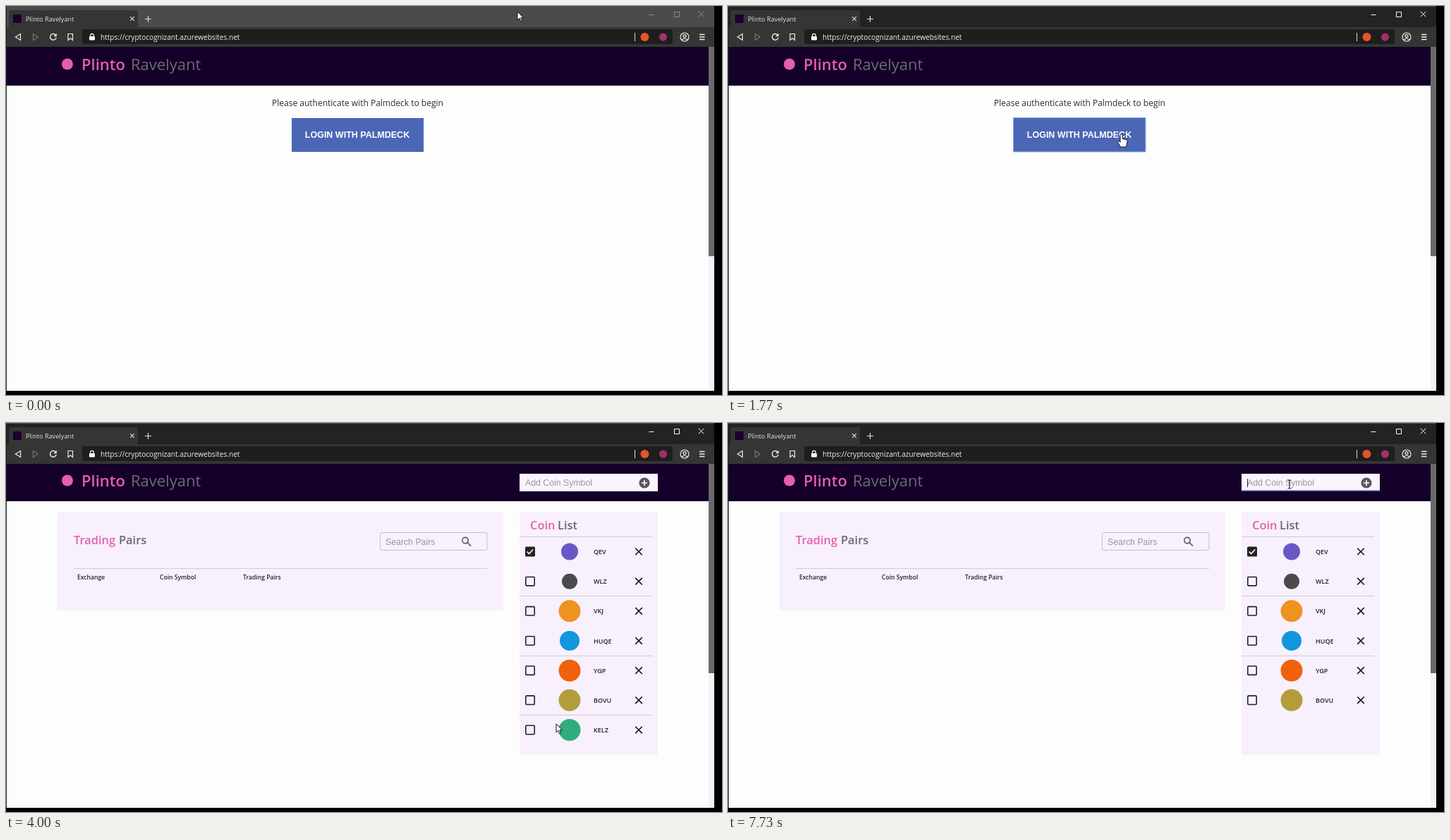
An HTML page for the animation above (8000 ms loop, 1015x552 px).

```html
<!DOCTYPE html>
<html lang="en">
<head>
<meta charset="utf-8">
<title>Coin list demo</title>
<style>
  html, body { margin: 0; width: 100%; height: 100%; overflow: hidden; background: #000; }
  svg { display: block; font-family: "Open Sans", "Noto Sans", sans-serif; }
  .arial { font-family: "Liberation Sans", Arial, sans-serif; }
  .semi { font-weight: 600; }
  .line { fill: none; stroke-linecap: butt; }
</style>
</head>
<body>
<svg id="stage" width="1015" height="552" viewBox="0 0 1015 552"></svg>
<script>
const LOOP = 8000;
const PINK = '#e65fa8', GREY = '#6c6670', PANEL = '#f8f0fd', NAVY = '#140029';

const rect = (x, y, w, h, fill, more = '') =>
  `<rect x="${x}" y="${y}" width="${w}" height="${h}" fill="${fill}" ${more}/>`;
const dot = (x, y, r, fill) => `<circle cx="${x}" cy="${y}" r="${r}" fill="${fill}"/>`;
const line = (d, color, w = 1, more = '') =>
  `<path class="line" d="${d}" stroke="${color}" stroke-width="${w}" ${more}/>`;
const text = (x, y, size, fill, str, more = '') =>
  `<text x="${x}" y="${y}" font-size="${size}" fill="${fill}" ${more}>${str}</text>`;
const group = (id, body) => `<g id="${id}">${body}</g>`;
const cross = (x, y, r, color, w) =>
  line(`M${x - r} ${y - r}l${2 * r} ${2 * r}m0 ${-2 * r}l${-2 * r} ${2 * r}`, color, w);

const SEMI = 'class="semi"', ARIAL = 'class="arial"';

function browser() {
  return rect(0, 0, 1004, 547, '#1b1b1b') +
    rect(1, 1, 1003, 57, '#232323', 'id="strip"') +
    rect(0, 0, 1004, 1, '#505050') +
    `<path d="M4 30V9q0-3 3-3H184q3 0 3 3V30z" fill="#353535"/>` +
    rect(1, 30, 1003, 28, '#353535') +
    rect(10, 12, 12, 12, '#1a0030') +
    text(28, 21.5, 9.2, '#e2e2e2', 'Plinto Ravelyant') +
    cross(179, 18, 2.8, '#ddd', 1.2) +
    line('M197 18.5h9M201.5 14v9', '#ddd', 1.2) +
    group('winbuttons',
      line('M911.5 12.5h7', '#fff') +
      line('M947.5 8.5h7v7h-7z', '#fff') +
      cross(985.5, 11.5, 3.8, '#fff', 1)) +
    line('M20.5 39.5v9l-7-4.5z', '#eee', 1.2) +
    line('M38.5 39.5v9l7-4.5z', '#777', 1.2) +
    line('M70.6 41.4a4.4 4.4 0 1 0 .6 3.6', '#eee', 1.4) +
    `<path d="M71.8 38.8v4.4h-4.4z" fill="#eee"/>` +
    line('M88 39.5h6.5v9l-3.2-2.8-3.3 2.8z', '#eee', 1.2) +
    rect(108, 33, 837, 21, '#1e1e1e', 'rx="3"') +
    rect(118, 43, 8, 5.5, '#fff', 'rx="1"') +
    line('M119.8 43.5v-2a2.2 2.2 0 0 1 4.4 0v2', '#fff', 1.2) +
    text(134, 47.5, 10.1, '#f0f0f0', 'https://cryptocognizant.azurewebsites.net') +
    line('M891.5 38v12', '#ddd') +
    dot(905.5, 44, 6, '#e8532a') +
    dot(931.5, 44, 5.5, '#a3306e') +
    line('M956 44a6 6 0 1 0 12 0a6 6 0 1 0-12 0M958 48q4-3.5 8 0', '#eee', 1.2) +
    line('M960 42.6a2 2 0 1 0 4 0a2 2 0 1 0-4 0', '#eee', 1.2) +
    line('M983 40.5h7.5M983 44h7.5M983 47.5h7.5', '#eee', 1.3) +
    rect(1, 58, 1003, 488, '#fdfdfd') +
    rect(996, 58, 8, 488, '#f6f0fb') +
    rect(996, 58, 8, 297, '#6a6a6a');
}

// Header bar; the login page has a slightly taller one
const header = (h, base) =>
  rect(1, 58, 995, h, NAVY) +
  dot(87, base - 8.5, 8, PINK) +
  text(107, base, 22, PINK, 'Plinto', SEMI) +
  text(177, base, 22, '#6e6a70', 'Ravelyant', 'font-weight="500"');

function loginPage() {
  return header(55, 91) +
    text(498.5, 142, 12, '#2c2c30', 'Please authenticate with Palmdeck to begin', 'text-anchor="middle"') +
    rect(405, 159, 187, 48, '#4c66b6') +
    line('M404.5 158.5h187.5v48.5h-187.5z', '#8fb0ee', 1, 'id="ring"') +
    text(498, 187, 12.5, '#fff', 'LOGIN WITH PALMDECK', 'class="arial" font-weight="700" text-anchor="middle"');
}

const coins = [
  ['QEV', '#6a58c4', 12], ['WLZ', '#4b4b4b', 11], ['VKJ', '#ee9322', 15.5], ['HUQE', '#1496dc', 14],
  ['YGP', '#f0610c', 15.5], ['BOVU', '#b39c3c', 15.5], ['KELZ', '#2fae7c', 15.5]
];

function coinRow([name, color, r], i) {
  const y = 182.5 + i * 42.17;
  const box = i === 0
    ? rect(736, y - 7, 14, 14, '#222', 'rx="1.5"') + line(`M738.6 ${y}l3 3 5.6-6`, '#fff', 1.6)
    : rect(736.8, y - 6.2, 12.4, 12.4, 'none', 'rx="1" stroke="#222" stroke-width="1.6"');
  const rule = i && i % 2 === 0 ? line(`M728 ${Math.round(y - 21.5) + .5}H916`, '#cfcbd3') : '';
  return group('row' + i, rule + box + dot(799, y, r, color) +
    text(833, y + 3.5, 9, '#222', name, SEMI) + cross(897, y, 4.8, '#111', 1.6));
}

function appPage() {
  const heads = [[101, 'Exchange'], [218, 'Coin Symbol'], [336, 'Trading Pairs']];
  return header(53, 90) +
    rect(728, 72, 196, 25, '#fbf4fe') +
    text(736, 89, 12.3, '#9c959e', 'Add Coin Symbol', ARIAL) +
    dot(905, 85, 7.6, '#5c565e') +
    line('M901 85h8M905 81v8', '#fff', 1.6) +
    rect(728, 95.5, 196, 1.5, '#4653a4', 'id="focus"') +
    rect(736, 79, 1, 12, '#222', 'id="caret"') +
    rect(73, 126, 632, 140, PANEL) +
    text(96, 172, 16.4, PINK, 'Trading', SEMI) +
    text(160, 172, 16.4, GREY, 'Pairs', SEMI) +
    rect(530.5, 155.5, 151.5, 25, 'none', 'id="search" rx="2.5" stroke="#c9bfc4"') +
    text(538, 172.5, 12.3, '#9c959e', 'Search Pairs', ARIAL) +
    line('M646.8 166.6a4.2 4.2 0 1 0 8.4 0a4.2 4.2 0 1 0-8.4 0M654 169.6l5 5', '#625b68', 1.7) +
    line('M96 206.5H682', '#cfcbd3') +
    heads.map(([x, s]) => text(x, 222, 8.6, '#26222a', s, SEMI)).join('') +
    rect(728, 126, 196, 345, PANEL) +
    text(743, 151, 16.4, PINK, 'Coin', SEMI) +
    text(782, 151, 16.4, GREY, 'List', SEMI) +
    line('M728 161.5H916', '#cfcbd3') +
    coins.map(coinRow).join('');
}

const shape = (id, d) =>
  `<path id="${id}" d="${d}" fill="#fff" stroke="#111" stroke-width="1" stroke-linejoin="round"/>`;
const pointers =
  shape('arrow', 'M0 0V12l2.8-2.6 2 4.7 1.9-.8-2-4.5H8.6z') +
  shape('hand', 'M-2 10V1.2a1.6 1.6 0 0 1 3.2 0V6.5l5 1q2 .5 2 2.5l-.8 4-1 4H-1.5l-3.8-6.5q-.8-1.6.8-2 1 0 2.5 2z') +
  line('M-2.5-6q2 0 2.5 1 .5-1 2.5-1M0-5V5M-2.5 6q2 0 2.5-1 .5 1 2.5 1', '#222', 1.1, 'id="beam"');

const stage = document.getElementById('stage');
stage.innerHTML = browser() + group('login', loginPage()) + group('app', appPage()) + group('pointer', pointers);
const el = id => document.getElementById(id);
const show = (id, on) => el(id).setAttribute('visibility', on ? 'inherit' : 'hidden');

// time, x, y
const path = [
  [0, 725, 8], [30, 725, 8], [330, 722, 10], [730, 722, 10], [1200, 558, 182],
  [3000, 558, 182], [3330, 572, 131], [3500, 572, 131], [4000, 780, 427],
  [4300, 780, 427], [4670, 905, 437], [4870, 905, 437], [5130, 897, 434],
  [5970, 897, 434], [6270, 801, 111], [6770, 796, 87], [LOOP, 796, 87]
];
const looks = [
  [0, 'arrow'], [1080, 'hand'], [1670, 'arrow'], [1770, 'hand'], [3060, 'beam'], [3200, 'arrow'],
  [3580, 'beam'], [3650, 'arrow'], [4560, 'hand'], [5600, 'arrow'], [6450, 'beam']
];

const clamp = v => Math.min(1, Math.max(0, v));
const ease = p => p * p * (3 - 2 * p);

function pointerAt(t) {
  const i = path.findIndex(k => k[0] > t);
  const [t0, x0, y0] = path[i - 1], [t1, x1, y1] = path[i];
  const p = ease((t - t0) / (t1 - t0));
  return [x0 + (x1 - x0) * p, y0 + (y1 - y0) * p];
}

function draw(t) {
  const active = clamp((t - 30) / 220);
  const g = Math.round(75 - 40 * active);
  el('strip').setAttribute('fill', `rgb(${g},${g},${g})`);
  el('winbuttons').setAttribute('opacity', .35 + .65 * active);

  const inApp = t >= 1870;
  show('login', !inApp);
  show('app', inApp);
  show('ring', t >= 1530 && !inApp);
  show('row6', t < 5600);

  const look = looks.filter(k => k[0] <= t).pop()[1];
  const [x, y] = pointerAt(t);
  el('pointer').setAttribute('transform', `translate(${x.toFixed(2)} ${y.toFixed(2)})`);
  for (const id of ['arrow', 'hand', 'beam']) show(id, id === look);
  el('search').setAttribute('stroke', look === 'beam' && t < 4000 ? '#55505a' : '#c9bfc4');

  const w = 196 * ease(clamp((t - 6730) / 230));
  el('focus').setAttribute('x', 826 - w / 2);
  el('focus').setAttribute('width', w);
  show('caret', t >= 6730 && Math.floor((t - 6730) / 500) % 2 === 0);
}

function tick() {
  draw(performance.now() % LOOP);
  requestAnimationFrame(tick);
}
tick();
</script>
</body>
</html>
```
